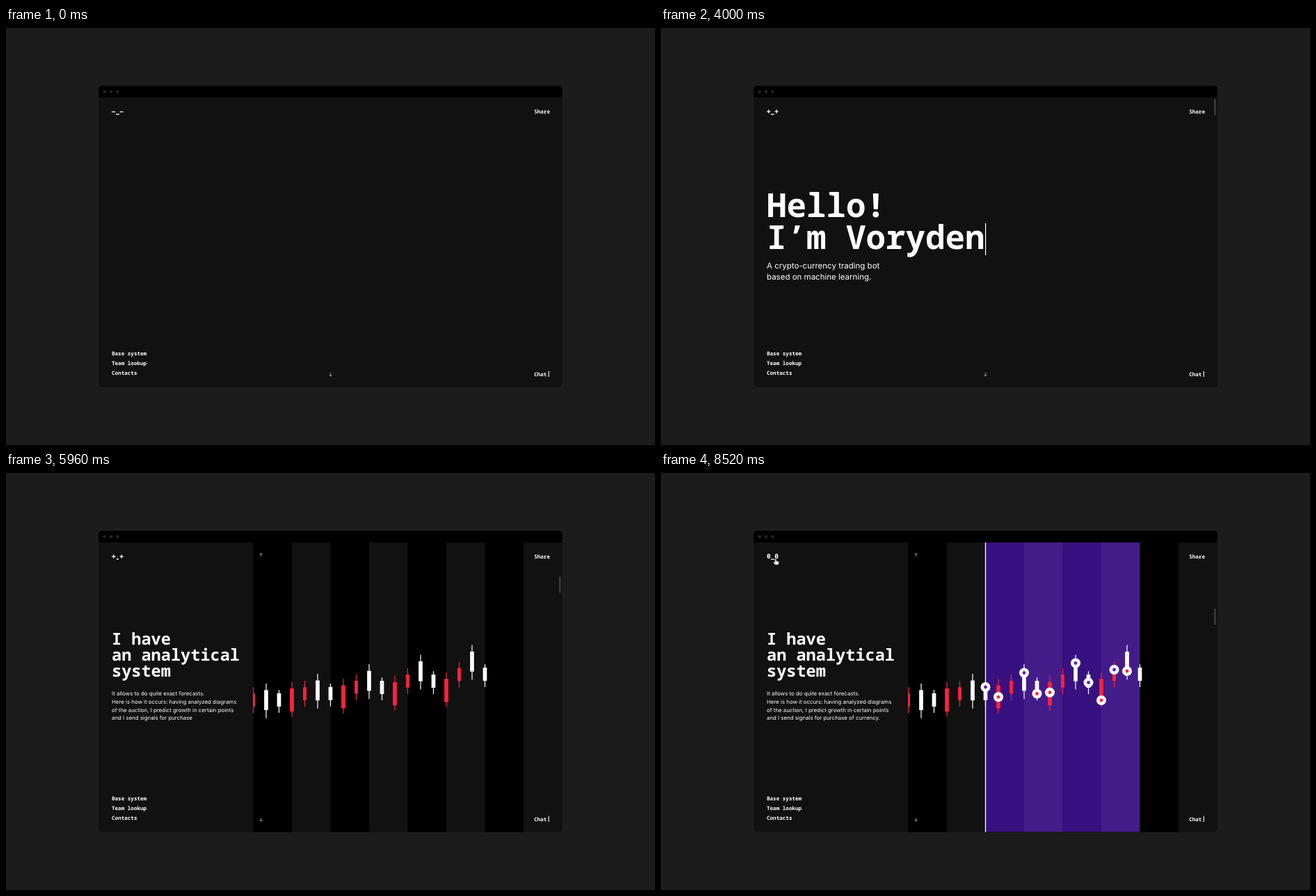
Write an HTML page that moves like this. It is 933 px wide and 600 px high and loops after 9 s.

```html
<!DOCTYPE html>
<html lang="en">
<head>
<meta charset="utf-8">
<title>Trading bot</title>
<style>
  html, body { margin: 0; width: 100%; height: 100%; overflow: hidden; background: #1c1c1c; }
  svg { display: block; position: fixed; inset: 0; width: 100%; height: 100%; }
  text { fill: #fff; text-rendering: geometricPrecision; }
  .mono { font-family: "Noto Sans Mono", "DejaVu Sans Mono", monospace; font-weight: 700; }
  .sans { font-family: Inter, "Open Sans", sans-serif; font-weight: 400; }
  .nav { font-size: 7.6px; }
  .hero { font-size: 47.5px; }
  .sub { font-size: 11.5px; }
  .head { font-size: 23.6px; }
  .body { font-size: 7.85px; }
  .icon { fill: none; stroke: #aaa; stroke-width: .8; }
  .eyes { fill: none; stroke: #fff; stroke-width: 1.3; }

  .anim { animation: 9s cubic-bezier(.333, 0, .667, 1) infinite both; }
  .dash, .plus, .zero { animation-timing-function: step-end; }
  .dash { animation-name: dash; }
  .plus { animation-name: plus; }
  .zero { animation-name: zero; }
  .intro { animation-name: intro; }
  .thumb { animation-name: thumb; }
  .arrows { animation-name: arrows; }
  .up { animation-name: up; }
  .panel { animation-name: panel; }
  .gap { animation-name: gap; transform-box: fill-box; transform-origin: center; }
  .hand { animation-name: hand; }

  @keyframes dash {
    0%, 4% , 5.777% { opacity: 1; }
    0% { opacity: 1; }
    2.222% { opacity: 0; }
    4% { opacity: 1; }
    5.777% { opacity: 0; }
    7.555% { opacity: 1; }
    11.111%, 100% { opacity: 0; }
  }
  @keyframes plus {
    0% { opacity: 0; }
    2.222% { opacity: 1; }
    4% { opacity: 0; }
    5.777% { opacity: 1; }
    7.555% { opacity: 0; }
    11.111% { opacity: 1; }
    93.333%, 100% { opacity: 0; }
  }
  @keyframes zero {
    0% { opacity: 0; }
    93.333%, 100% { opacity: 1; }
  }
  @keyframes intro {
    0%, 44.6% { opacity: 1; }
    49%, 100% { opacity: 0; }
  }
  @keyframes thumb {
    0%, 44.43% { opacity: 0; transform: translateY(0); }
    44.44% { opacity: 1; transform: translateY(0); }
    61.78%, 67.22% { opacity: 1; transform: translateY(46.5px); }
    87.89%, 100% { opacity: 1; transform: translateY(93px); }
  }
  @keyframes arrows {
    0%, 46% { transform: translateX(466.5px); }
    59.33%, 100% { transform: translateX(366.5px); }
  }
  @keyframes up {
    0%, 49% { opacity: 0; }
    57%, 100% { opacity: 1; }
  }
  @keyframes panel {
    0%, 46.21% { opacity: 0; transform: translateX(104px); }
    46.22% { opacity: 1; transform: translateX(104px); }
    59.56%, 100% { opacity: 1; transform: translateX(0); }
  }
  @keyframes gap {
    0%, 46.56% { transform: scaleX(1); }
    59.89%, 100% { transform: scaleX(0); }
  }
  @keyframes hand {
    0%, 88.9% { opacity: 0; transform: translate(245px, 190px); }
    90.5% { opacity: 1; }
    93.8%, 100% { opacity: 1; transform: translate(164.6px, 123px); }
  }
</style>
</head>
<body>
<svg viewBox="0 0 933 600" preserveAspectRatio="none">
  <defs>
    <clipPath id="screen"><rect x="133.3" y="100" width="666.4" height="416.6" rx="4"/></clipPath>
    <clipPath id="fromEdge"><rect x="355.3" y="100" width="600" height="416.6"/></clipPath>
    <clipPath id="scanned"><rect id="scanBox" x="688.5" y="100" width="0" height="416.6"/></clipPath>
  </defs>

  <rect x="133.3" y="83.3" width="666.4" height="433.3" rx="4.5" fill="#111"/>
  <path d="M133.3 100V87.8a4.5 4.5 0 0 1 4.5-4.5H795.2a4.5 4.5 0 0 1 4.5 4.5V100z"/>
  <g fill="#222">
    <circle cx="141.7" cy="91.6" r="2.3"/><circle cx="151" cy="91.6" r="2.3"/><circle cx="160.3" cy="91.6" r="2.3"/>
  </g>

  <g clip-path="url(#screen)">
    <g class="anim panel">
      <g clip-path="url(#fromEdge)">
        <g id="columns"></g>
        <g id="bands" clip-path="url(#scanned)"></g>
        <g id="candles"></g>
        <rect id="scanLine" y="100" width="1.4" height="416.6" fill="#f4f0fa"/>
        <g id="marks"></g>
        <g id="gaps"></g>
      </g>
    </g>
    <rect class="anim thumb" x="795" y="102" width="2.7" height="23.5" rx="1.3" fill="#3a3a3a"/>
  </g>

  <g class="anim arrows">
    <path class="icon" transform="translate(0 498.2)" d="M0-2.4V1.6M-1.4.2L0 1.6 1.4.2M-1.9 2.3H1.9"/>
    <path class="icon anim up" d="M0 120.5V116.5M-1.4 117.9L0 116.5 1.4 117.9M-1.9 115.8H1.9"/>
  </g>

  <path class="eyes anim dash" d="M152.2 120.6h5M163.6 120.6h5"/>
  <path class="eyes anim plus" d="M152.2 120.1h5.2M154.8 117.5v5.2M163.5 120.1h5.2M166.1 117.5v5.2"/>
  <g class="mono anim zero" font-size="9.4"><text x="152" y="123.4">0</text><text x="163.3" y="123.4">0</text></g>
  <path id="mouth" class="eyes"/>

  <g class="mono nav">
    <text x="759.2" y="123.3">Share</text>
    <text x="152" y="471.3">Base system</text>
    <text x="152" y="485.3">Team lookup</text>
    <text x="152" y="499.2">Contacts</text>
    <text x="759.2" y="500.5">Chat</text>
    <rect x="779.7" y="493.6" width="1.1" height="8.4" fill="#fff"/>
  </g>

  <g class="anim intro">
    <g id="hero" class="mono hero">
      <text x="152" y="272">Hello!</text>
      <text x="152" y="318">I’m Voryden</text>
    </g>
    <rect id="caret" width="1.2" height="46" fill="#fff"/>
    <g id="sub" class="sans sub">
      <text x="152" y="345.6">A crypto-currency trading bot</text>
      <text x="152" y="361.7">based on machine learning.</text>
    </g>
  </g>

  <g id="head" class="mono head">
    <text x="152" y="246.5">I have</text>
    <text x="152" y="269.8">an analytical</text>
    <text x="152" y="293.1">system</text>
  </g>
  <g id="body" class="sans body">
    <text x="152" y="320.2">It allows to do quite exact forecasts.</text>
    <text x="152" y="331.9">Here is how it occurs: having analyzed diagrams</text>
    <text x="152" y="343.5">of the auction, I predict growth in certain points</text>
    <text x="152" y="355.2">and I send signals for purchase of currency.</text>
  </g>

  <path class="anim hand" fill="#fff" stroke="#111" stroke-width=".5"
    d="M-1 1a1 1 0 0 1 2 0v2.6l3 .7q1 .3 .9 1.4l-.6 3.4h-5l-2.5-3.4q-.2-1 .8-.9l1.4 .9z"/>
</svg>

<script>
const LOOP = 9000, LEFT = 355.3, COL = 55.53, STEP = 18.5;
const RED = '#f9233f', WHITE = '#fff', PURPLE = '#5a1fc4';
const SCAN = { start: 6100, length: 1810, from: 688.5, span: 222 };

const $ = id => document.getElementById(id);
const clamp = v => Math.max(0, Math.min(1, v));
const smooth = v => v * v * (3 - 2 * v);
const unsmooth = v => 0.5 - Math.sin(Math.asin(1 - 2 * v) / 3);

function add(parent, tag, attrs) {
  const el = document.createElementNS('http://www.w3.org/2000/svg', tag);
  for (const key in attrs) el.setAttribute(key, attrs[key]);
  return parent.appendChild(el);
}
function bar(parent, x, y, width, height, fill) {
  return add(parent, 'rect', { x, y, width, height, fill });
}

// Columns, purple bands and the covers that open between them
for (let k = 0; k < 4; k++) {
  const x = LEFT + 2 * k * COL;
  bar($('columns'), x, 100, COL, 416.6, '#000');
  bar($('gaps'), x, 100, 2 * COL, 416.6, '#111').setAttribute('class', 'anim gap');
  bar($('bands'), LEFT + (k + 2) * COL, 100, COL + 0.2, 416.6, k % 2 ? '#431c89' : '#37117f');
}

// Four repeating candle kinds: colour, width, body height, wick above, wick below
const kinds = [
  [RED, 4.9, 18.7, 9.2, 9.4],
  [WHITE, 5.7, 28.7, 9.5, 11.7],
  [WHITE, 5.7, 19, 4.8, 9],
  [RED, 5.8, 33.3, 9.3, 7.5]
];
const tops = [317.3, 312.4, 317, 310, 308.2, 298.5, 307.8, 305.5, 299, 284.7,
              299, 301, 290, 271, 290, 296.2, 280.6, 257, 280];
tops.forEach((top, i) => {
  const [fill, width, height, above, below] = kinds[i % 4];
  const x = 355.5 + i * STEP;
  bar($('candles'), x - 0.6, top - above, 1.2, above + height + below, fill);
  bar($('candles'), x - width / 2, top, width, height, fill);
});

// Signal marks: candle index, height, colour
const marks = [
  [6, 308, PURPLE], [7, 322.3, RED], [9, 287.5, PURPLE], [10, 317.5, RED], [11, 315.7, RED],
  [13, 273.5, PURPLE], [14, 301.5, PURPLE], [15, 327, RED], [16, 283, PURPLE], [17, 285, RED]
].map(([i, y, fill]) => {
  const x = 355.5 + i * STEP;
  const el = add($('marks'), 'g', {});
  add(el, 'circle', { r: 7, fill: WHITE });
  add(el, 'circle', { r: 2.4, fill });
  const reached = SCAN.start + SCAN.length * unsmooth(clamp((SCAN.from - x) / SCAN.span));
  return { el, x, y, start: reached - 200 };
});

function typer(id) {
  const lines = [...$(id).children].map(el => ({ el, text: el.textContent }));
  return count => {
    let left = Math.max(0, Math.floor(count));
    for (const { el, text } of lines) {
      const part = text.slice(0, left);
      if (el.textContent !== part) el.textContent = part;
      left = Math.max(0, left - text.length);
    }
  };
}
const hero = typer('hero'), sub = typer('sub'), head = typer('head'), body = typer('body');

function drawHero(t) {
  const first = t < 1000 ? 0 : Math.min(6, 1 + Math.floor((t - 1000) / 40));
  const second = t < 1480 ? 0 : Math.min(11, 1 + Math.floor((t - 1480) / 51));
  const onSecond = first === 6;
  hero(first + second);
  const caret = $('caret');
  caret.setAttribute('x', 152 + 28.5 * (onSecond ? second : first) + 0.5);
  caret.setAttribute('y', onSecond ? 281 : 235);
  caret.setAttribute('opacity', t < 1000 ? 0 : 1);
}

function drawMouth(t) {
  const now = t > 2000 && t < 2520 ? 2000 : t;
  const talk = [[1000, 1200], [1480, 2000], [2520, 3000], [4900, 6000]]
    .find(([a, b]) => now >= a && now <= b);
  const small = talk && Math.floor((now - talk[0]) / 120) % 2 === 0;
  $('mouth').setAttribute('d', small ? 'M158.9 123.4q1.5 1.3 3 0' : 'M157.9 124.2h5');
}

function drawScan(t) {
  const x = SCAN.from - SCAN.span * smooth(clamp((t - SCAN.start) / SCAN.length));
  $('scanBox').setAttribute('x', x);
  $('scanBox').setAttribute('width', SCAN.from - x);
  $('scanLine').setAttribute('x', x - 0.7);
  $('scanLine').setAttribute('opacity', t > SCAN.start ? 1 : 0);
  for (const m of marks) {
    const scale = 1 - (1 - clamp((t - m.start) / 470)) ** 3;
    m.el.setAttribute('transform', `translate(${m.x} ${m.y}) scale(${scale})`);
  }
}

function draw(t) {
  drawHero(t);
  drawMouth(t);
  drawScan(t);
  sub(t < 2520 ? 0 : (Math.floor((t - 2520) / 40) + 1) * 4.3);
  head((t - 4900) / 19);
  body((t - 5380) * 0.2864);
}

let start;
function frame(now) {
  start ??= now;
  draw((now - start) % LOOP);
  requestAnimationFrame(frame);
}
draw(0);
requestAnimationFrame(frame);
</script>
</body>
</html>
```
